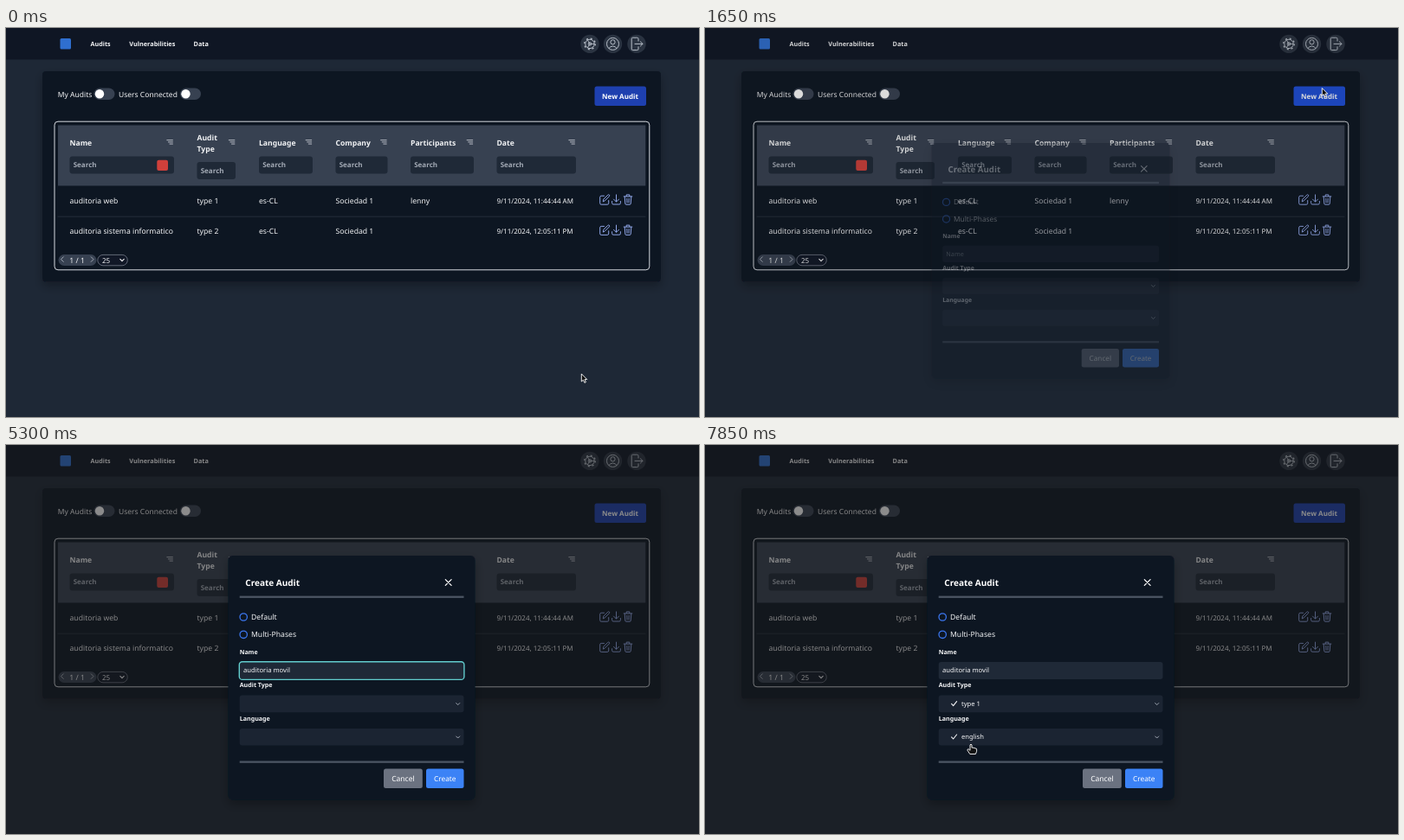
An HTML page for the animation above (8000 ms loop, 800x450 px).

```html
<!DOCTYPE html>
<html lang="en">
<head>
<meta charset="utf-8">
<title>Audits</title>
<style>
html, body { margin: 0; width: 100%; height: 100%; overflow: hidden; background: #1e2836; }
svg { display: block; width: 800px; height: 450px; }
text { font-family: "Noto Sans", "Open Sans", sans-serif; fill: #f3f4f6; white-space: pre; text-rendering: geometricPrecision; }
.line { fill: none; stroke-linecap: round; stroke-linejoin: round; }
</style>
</head>
<body>
<svg id="stage" viewBox="0 0 800 450"></svg>
<script>
const LOOP = 8000, STEP = 50;
const stage = document.getElementById('stage');

const text = (x, y, s, size, weight = 500, fill = '#f3f4f6', extra = '') =>
  `<text x="${x}" y="${y}" font-size="${size}" font-weight="${weight}" style="fill:${fill}" ${extra}>${s}</text>`;
const box = (x, y, x2, y2, fill, r = 3, extra = '') =>
  `<rect x="${x}" y="${y}" width="${x2 - x}" height="${y2 - y}" rx="${r}" fill="${fill}" ${extra}/>`;
const line = (d, color, width = 1, extra = '') =>
  `<path class="line" d="${d}" stroke="${color}" stroke-width="${width}" ${extra}/>`;
const ring = (x, y, r, color, width = 1, extra = '') =>
  `<circle cx="${x}" cy="${y}" r="${r}" fill="none" stroke="${color}" stroke-width="${width}" ${extra}/>`;
const disc = (x, y, r, fill) => `<circle cx="${x}" cy="${y}" r="${r}" fill="${fill}"/>`;

const toggle = x => box(x, 69.5, x + 24, 83, '#374151', 6.75) + disc(x + 6.5, 76.2, 5.2, '#fff');

function header() {
  const c = '#b9c0ca';
  const icons = [674, 700.5, 728].map(x => disc(x, 18.4, 10.7, '#2a3341')).join('');
  return box(0, 0, 800, 36.5, '#0f1624', 0) +
    box(62.5, 12, 75, 24.5, '#2f6fd0', 1.5) +
    text(97.5, 21.3, 'Audits', 7.2, 700) +
    text(142.3, 21.3, 'Vulnerabilities', 7.3, 600) +
    text(216.5, 21.3, 'Data', 7.3, 600) + icons +
    ring(674, 18.4, 5.2, c) + ring(674, 18.4, 6.3, c, 1.4, 'stroke-dasharray="2 2.95"') +
    line('M674 18.4h5M674 18.4l-2.5 4.3M674 18.4l-2.5-4.3', c, .9) + ring(674, 18.4, 1.8, c, .9) +
    ring(700.5, 18.4, 7, c) + ring(700.5, 16.3, 2.6, c) +
    line('M696 23.6q1.2-2.6 4.5-2.6t4.5 2.6', c) +
    line('M730 15v-2.4q0-1.4-1.4-1.4h-5q-1.4 0-1.4 1.4v11.6q0 1.4 1.4 1.4h5q1.4 0 1.4-1.4v-2.4M726 18.4h9M732.4 15.8l2.6 2.6-2.6 2.6', c);
}

function column([label, x, x2, iconX]) {
  const two = label.includes(' ');
  const y = two ? 155 : 148.5;
  const words = two
    ? label.split(' ').map((w, i) => text(x, 129.6 + i * 13.5, w, 8.6, 700)).join('')
    : text(x, 136.2, label, 8.6, 700);
  return words +
    line(`M${iconX - 3.2} 129.7h6.6M${iconX - 1.6} 131.9h5M${iconX} 134.1h3.4`, '#c3c8d0', .9) +
    box(x, y, x2, y + 20, '#1f2937') +
    text(x + 4.2, y + 12.8, 'Search', 8, 600, '#a3aab5');
}

function actions(y) {
  const c = '#8fa5e6';
  return `<g transform="translate(0 ${y})">` +
    line('M690.5-4.3h-3.3q-1.5 0-1.5 1.5v7q0 1.5 1.5 1.5h7q1.5 0 1.5-1.5v-3.2M689.3 2l.5-2.4 5-5q.8-.7 1.6 0t0 1.6l-5 5z', c) +
    line('M704.5-5.6v8M701.5-.4l3 3 3-3M699.6 2v2q0 1.5 1.5 1.5h6.8q1.5 0 1.5-1.5v-2', c) +
    line('M713.2-3.6h9.6M716.2-3.8v-1.8h3.6v1.8M714.2-3.4l.6 8q.1 1.1 1.2 1.1h4q1.1 0 1.2-1.1l.6-8M716.8-1.2l.2 4.6M719.2-1.2l-.2 4.6', c) + '</g>';
}

function row(y, name, type, company, person, date) {
  const cells = [[73.5, name], [220.5, type], [292, 'es-CL'], [380.5, company], [467, person]];
  return cells.map(([x, s]) => text(x, y + 3.1, s, 8.65)).join('') +
    text(566.5, y + 3.1, date, 8) + actions(y - 1.5);
}

function page() {
  const columns = [
    ['Name', 73.5, 194, 189], ['Audit Type', 220.5, 265, 260.5], ['Language', 292, 354, 349.3],
    ['Company', 380.5, 440.5, 435.8], ['Participants', 467, 540, 535.3], ['Date', 566.5, 658, 653],
  ];
  return box(0, 0, 800, 450, '#1e2836', 0) + header() +
    box(42, 50, 756, 293.5, '#0e1523', 4, 'filter="url(#shadow)"') +
    text(59.8, 80.2, 'My Audits', 8.5) + toggle(101.5) +
    text(130, 80.2, 'Users Connected', 8.5) + toggle(201) +
    box(679.5, 67.5, 739, 90, '#1e40af', 2.5, 'id="newButton"') +
    text(709, 81.9, 'New Audit', 8, 700, '#fff', 'text-anchor="middle"') +
    box(56, 108.2, 742.8, 279.8, 'none', 4, 'stroke="#d5d9df" stroke-width="1"') +
    box(60, 112.5, 738.3, 182.5, '#374151', 0) +
    columns.map(column).join('') +
    box(174.3, 152.8, 187, 165, '#d0403b', 2) +
    row(200, 'auditoria web', 'type 1', 'Sociedad 1', 'lenny', '9/11/2024, 11:44:44 AM') +
    line('M60 218.2H738', '#2a3442', .8) +
    row(235.2, 'auditoria sistema informatico', 'type 2', 'Sociedad 1', '', '9/11/2024, 12:05:11 PM') +
    box(60.5, 262, 104.5, 275, '#374151', 6.5) +
    line('M66.3 264.8l-2.8 2.8 2.8 2.8M98.2 264.8l2.8 2.8-2.8 2.8', '#aeb5c0', .9) +
    text(73.3, 271.9, '1 / 1', 8.7) +
    box(105.8, 262.4, 140.3, 274.8, '#111827', 6.2, 'stroke="#6b7280" stroke-width=".9"') +
    text(111, 271.7, '25', 8) + line('M131.8 267.4l2.2 2.2 2.2-2.2', '#f3f4f6', 1.1);
}

const radio = (y, label) => ring(274.2, y, 4.2, '#3b76ee', 1.3) + text(283, y + 3, label, 8.65);
const select = y => box(269.7, y, 528.5, y + 19.6, '#1b2432') +
  line(`M519.7 ${y + 9}l2 2 2-2`, '#aeb5c0', .9);
const choice = (y, label) => line(`M284.6 ${y}l2 2.2 4-5`, '#f3f4f6', 1.1) + text(296, y + 2.4, label, 7.6);

function modal() {
  return box(256.5, 128, 541.5, 410.5, '#0d1423', 5, 'filter="url(#shadow)"') +
    text(276.3, 162.9, 'Create Audit', 10, 700, '#fff') +
    line('M507.3 155.6l6.8 6.8M514.1 155.6l-6.8 6.8', '#fff', 1.2) +
    box(269.7, 174.6, 528.5, 176.9, '#4b5563', 0) +
    radio(199, 'Default') + radio(219.3, 'Multi-Phases') +
    text(269.7, 242, 'Name', 7, 600) +
    box(269.7, 251, 528.5, 271, '#1f2937') +
    box(269.3, 250.7, 528.9, 271.4, 'none', 3.5, 'id="focus" stroke="#62cdce" stroke-width="1.4"') +
    text(274, 263.6, 'Name', 7.5, 400, '#9ca3af', 'id="hint"') +
    text(274, 263.4, '<tspan id="typed"></tspan><tspan id="caret" font-weight="300" dx="-.6">|</tspan>', 7.65) +
    text(269.7, 280.2, 'Audit Type', 7.1, 600) + select(289.6) +
    text(269.7, 318.5, 'Language', 7.1, 600) + select(328) +
    `<g id="chosen">${choice(299.4, 'type 1')}${choice(337.8, 'english')}</g>` +
    box(269.7, 365.5, 528.5, 367.8, '#4b5563', 0) +
    box(436, 374.6, 480.8, 397, '#6b7280', 2.5) +
    text(458.4, 388.9, 'Cancel', 8.5, 500, '#fff', 'text-anchor="middle"') +
    box(485, 374.6, 528.5, 397, '#3b82f6', 2.5) +
    text(506.8, 388.9, 'Create', 8.3, 500, '#fff', 'text-anchor="middle"') +
    `<g id="menu">${box(269.7, 309.8, 528.7, 356, '#252120', 4)}` +
    text(292.2, 325.3, 'type 2', 7.6) + text(292.2, 345.5, 'type 1', 7.6) + '</g>';
}

const pointer = (id, d) =>
  `<path id="${id}" d="${d}" fill="#111" stroke="#fff" stroke-width=".9" stroke-linejoin="round"/>`;

stage.innerHTML =
  `<defs><filter id="shadow" x="-10%" y="-10%" width="120%" height="125%">
    <feDropShadow dx="0" dy="5" stdDeviation="6" flood-color="#000" flood-opacity=".3"/></filter></defs>` +
  page() + box(0, 0, 800, 450, '#181818', 0, 'id="shade"') + `<g id="modal">${modal()}</g>` +
  '<g id="cursor">' +
  pointer('arrow', 'M.3 0V9L2.4 7.2 3.9 10.4 5.4 9.7 4 6.6H6.8Z') +
  pointer('hand', 'M-1 .9Q0-.6 1 .9V4.2Q2.2 3.4 3 4.5 4.2 3.8 4.9 5 6.6 4.6 6.6 6.2V8.3L5.4 11.5H-1.2L-4 7.2Q-4.3 5.4-2.6 5.9L-1 7.3Z') +
  line('M-1.6-5Q0-5 0-4V4Q0 5-1.6 5M1.6-5Q0-5 0-4M0 4Q0 5 1.6 5', '#e5e7eb', .9, 'id="beam"') + '</g>';

const el = id => document.getElementById(id);
const show = (id, on) => el(id).setAttribute('opacity', +on);
const ramp = (t, a, b) => Math.min(1, Math.max(0, (t - a) / (b - a)));
const easeOut = p => 1 - (1 - p) ** 2;
const smooth = p => p * p * (3 - 2 * p);

// time, x, y
const path = [
  [650, 664, 400], [1250, 712, 69.5], [1800, 712, 69.5], [2400, 319.5, 276], [2550, 319.5, 276],
  [2700, 312, 261], [5850, 312, 261], [6250, 309.5, 299], [6750, 309.5, 299], [6950, 309, 311],
  [7250, 306, 341], [7550, 308, 347.5], [7700, 308, 347.5], [7850, 307, 346],
];
// moment at which each letter of the name appears
const value = 'auditoria movil';
const keys = [3400, 3450, 3650, 3750, 3750, 4050, 4100, 4150, 4450, 4650, 4750, 4850, 4900, 5150, 5150];

function position(t) {
  let i = path.findIndex(p => p[0] > t);
  if (i < 0) return path[path.length - 1].slice(1);
  if (i === 0) return path[0].slice(1);
  const [a, x, y] = path[i - 1], [b, x2, y2] = path[i];
  const p = smooth(ramp(t, a, b));
  return [x + (x2 - x) * p, y + (y2 - y) * p];
}

function cursorKind(t, y) {
  if (t < 1650) return y < 90 ? 'hand' : 'arrow';
  if (t < 2650) return 'arrow';
  if (t >= 3400 && t < 5900) return '';
  return y < 271 ? 'beam' : y < 289 ? 'arrow' : 'hand';
}

function draw(t) {
  const [x, y] = position(t);
  const kind = cursorKind(t, y);
  el('cursor').setAttribute('transform', `translate(${x} ${y})`);
  for (const id of ['arrow', 'hand', 'beam']) show(id, id === kind);
  el('newButton').setAttribute('fill', t < 1700 && y < 90 ? '#1d4ed8' : '#1e40af');

  const open = easeOut(ramp(t, 1600, 1900));
  const scale = .95 + .05 * open;
  show('shade', open * .5);
  show('modal', open);
  el('modal').setAttribute('transform', `translate(399 269) scale(${scale}) translate(-399 -269)`);

  show('focus', t < 6450 ? ramp(t, 2850, 3150) : 0);
  show('hint', t < keys[0]);
  el('typed').textContent = value.slice(0, keys.filter(k => k <= t).length);
  el('caret').style.fillOpacity = +(t >= 2950 && t < 5300);

  show('menu', ramp(t, 6400, 6500) * (1 - ramp(t, 7250, 7350)));
  show('chosen', t >= 7250);
}

const start = performance.now();
function frame() {
  const t = (performance.now() - start) % LOOP;
  draw(Math.floor(t / STEP) * STEP);
  requestAnimationFrame(frame);
}
frame();
</script>
</body>
</html>
```
